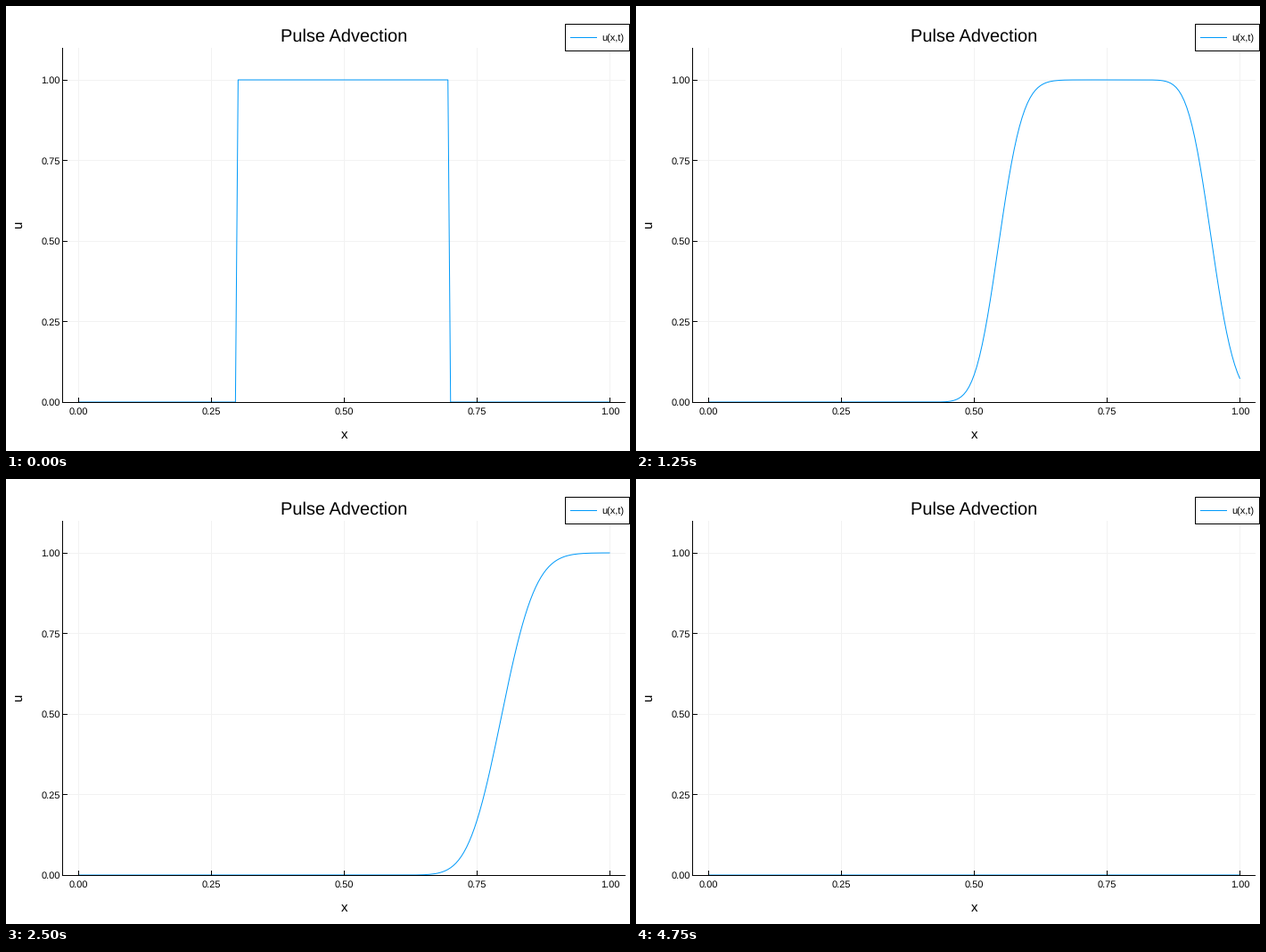
A matplotlib script that plays this animation: 700 by 500 pixels, repeating every 5.05 s.

```python
import math

import matplotlib.pyplot as plt
import numpy as np
from matplotlib.animation import FuncAnimation
from matplotlib.patches import Rectangle

W, H, DPI = 700, 500, 100
PX = 72 / DPI  # points per pixel
FRAMES, INTERVAL = 101, 50

CELLS = 200
DX = 1 / CELLS
SHIFT = 0.01  # distance travelled per frame

LEFT, RIGHT = 81.6, 677.5
BASE, TOP = 445.0, 83.0
BLUE, GRID = "#009afa", "#f2f2f2"

plt.rcParams["font.family"] = "Liberation Sans"
plt.rcParams["text.hinting"] = "none"


def to_x(v):
    return LEFT + (RIGHT - LEFT) * v


def to_y(v):
    return BASE + (TOP - BASE) * v


def advect():
    """First-order upwind advection of a square pulse, integrated exactly in time."""
    rate = SHIFT / DX
    kernel = [math.exp(-rate) * rate**k / math.factorial(k) for k in range(25)]
    i = np.arange(CELLS + 1)
    u = ((i >= 60) & (i < 140)).astype(float)
    states = [u]
    for _ in range(FRAMES - 1):
        u = np.convolve(u, kernel)[: CELLS + 1]
        states.append(u)
    return states


fig = plt.figure(figsize=(W / DPI, H / DPI), dpi=DPI, facecolor="white")
ax = fig.add_axes([0, 0, 1, 1])
ax.set_xlim(0, W)
ax.set_ylim(H, 0)
ax.axis("off")


def line(x0, y0, x1, y1, color="black", z=3):
    # Coordinates already sit on pixel centres, so snapping stays off.
    ax.plot([x0, x1], [y0, y1], color=color, lw=PX, zorder=z,
            solid_capstyle="butt", snap=False)


def text(x, y, s, size, ha="center", **kw):
    ax.text(x, y, s, fontsize=size * PX, color="black", zorder=6,
            ha=ha, va="baseline", **kw)


for v in np.linspace(0, 1, 5):
    x, y = math.floor(to_x(v)) + 0.5, math.floor(to_y(v)) + 0.5
    line(x, 47, x, 445, GRID, 1)
    line(64, y, 695, y, GRID, 1)
    line(x, 440, x, 445)
    line(64, y, 69, y)
    text(to_x(v), 459, f"{v:.2f}", 11)
    text(61, to_y(v) + 4, f"{v:.2f}", 11, ha="right")

line(63.5, 47, 63.5, 446)
line(63, 445.5, 695, 445.5)

text(379.5, 40, "Pulse Advection", 20)
text(379.5, 486, "x", 15)
text(19, 245.5, "u", 15, rotation=90, rotation_mode="anchor")

ax.add_patch(Rectangle((627.5, 20.5), 72, 30, facecolor="white",
                       edgecolor="black", lw=PX, zorder=4, snap=False))
line(633, 35.5, 663, 35.5, BLUE, 5)
text(668, 40, "u(x,t)", 11, ha="left")

states = advect()
xs = to_x(np.linspace(0, 1, CELLS + 1))
curve, = ax.plot(xs, to_y(states[0]), color=BLUE, lw=PX, zorder=2,
                 solid_capstyle="butt", snap=False)


def update(n):
    curve.set_ydata(to_y(states[n]))
    return (curve,)


anim = FuncAnimation(fig, update, frames=FRAMES, interval=INTERVAL,
                     repeat=True, repeat_delay=0, blit=False)

plt.show()
```
